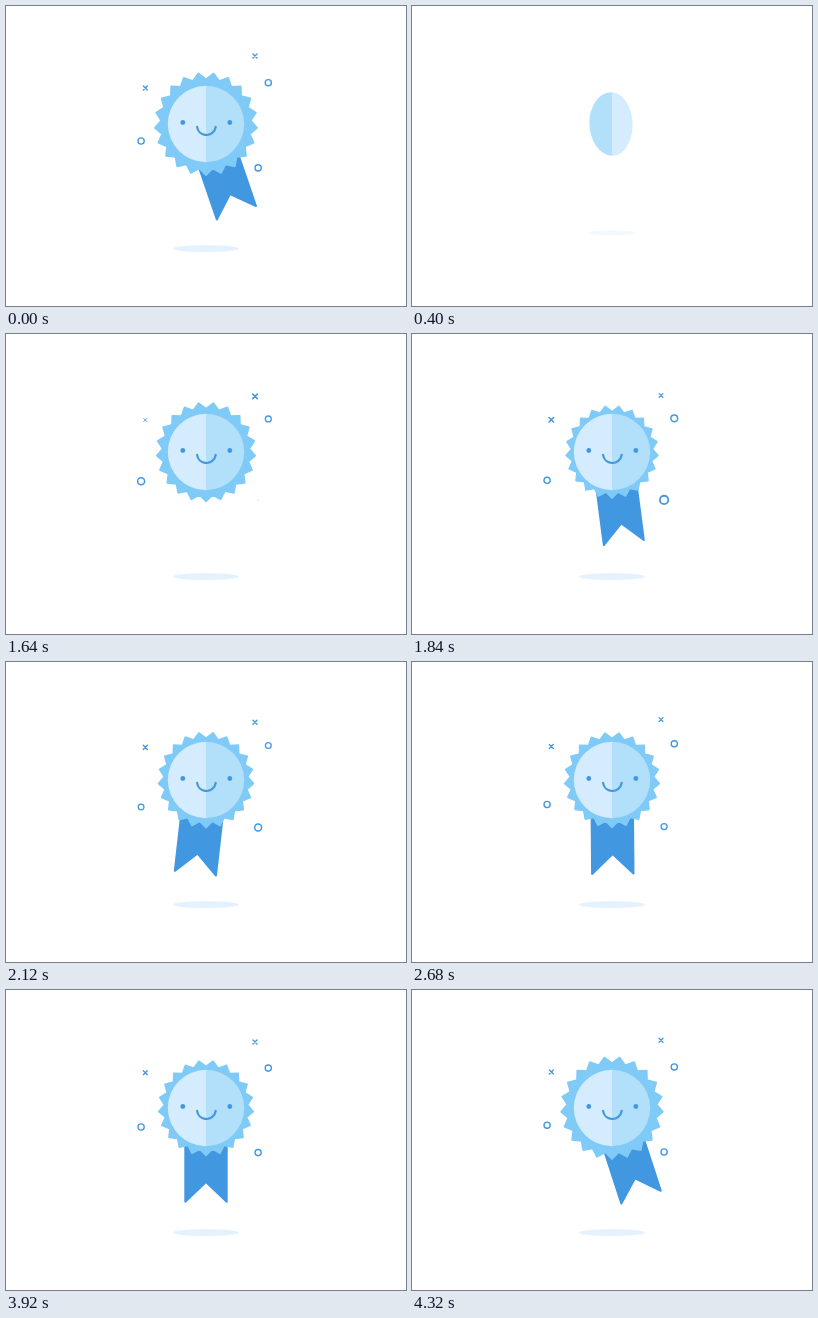
These frames come from a looping animation (400 by 300 pixels, 4.36 s). An HTML page with a canvas:

```html
<!DOCTYPE html>
<html lang="en">
<head>
<meta charset="utf-8">
<title>Smiling rosette</title>
<style>
  html, body { margin: 0; width: 100%; height: 100%; overflow: hidden; background: #fff; }
  canvas { display: block; }
</style>
</head>
<body>
<canvas id="stage" width="400" height="300"></canvas>
<script>
const ctx = document.getElementById('stage').getContext('2d');
const LOOP = 4360, TAU = Math.PI * 2, RAD = Math.PI / 180;
const BLUE = '#4297e1', RAYS = '#7fcaf7', LIGHT = '#d4ecfe', MID = '#b2dffa', SHADE = '#e3f2fe';

// x, y at the end of the loop, drift in px/s, start time, shape
const marks = [
  [249, 50, 4.55, 1130, 'x'],
  [139.3, 82, 1.5, 1285, 'x'],
  [262.3, 76.8, 3, 1365, 'o'],
  [135.1, 135, 4.5, 1390, 'o'],
  [252.1, 161.9, 1.6, 1620, 'o']
];

const span = (t, from, to) => Math.min(1, Math.max(0, (t - from) / (to - from)));
const inOut = p => p < .5 ? 2 * p * p : 1 - 2 * (1 - p) ** 2;
const easeOut = p => 1 - (1 - p) ** 2;
const spring = (t, decay, period) => {
  const s = t / 1000;
  return s <= 0 ? 0 : 1 - Math.exp(-decay * s) * Math.cos(TAU * s / period);
};

function layer(draw) {
  ctx.save();
  draw();
  ctx.restore();
}

function fillEllipse(x, y, rx, ry, color) {
  ctx.fillStyle = color;
  ctx.beginPath();
  ctx.ellipse(x, y, rx, ry, 0, 0, TAU);
  ctx.fill();
}

function fillRounded(color, width) {
  ctx.closePath();
  ctx.fillStyle = ctx.strokeStyle = color;
  ctx.lineWidth = width;
  ctx.fill();
  ctx.stroke();
}

function drawShadow(turn) {
  ctx.globalAlpha = Math.min(1, 1.9 * (1 - turn));
  const size = 1 - .37 * turn;
  fillEllipse(0, 124.6 * (1 - .17 * turn), 33.2 * size, 3.4 * size, SHADE);
}

function drawRibbon(angle, size) {
  ctx.rotate(angle * RAD);
  ctx.scale(size, size);
  ctx.beginPath();
  [[-20.7, 0], [-20.7, 93.8], [0, 74], [20.7, 93.8], [20.7, 0]].forEach(p => ctx.lineTo(...p));
  fillRounded(BLUE, 2);
}

function drawRays(size) {
  ctx.scale(size, size);
  ctx.beginPath();
  for (let i = 0; i < 42; i++) {
    const r = i % 2 ? 41.6 : 47.4, a = Math.PI / 2 + i * Math.PI / 21;
    ctx.lineTo(r * Math.cos(a), r * Math.sin(a));
  }
  fillRounded(RAYS, 1.6);
}

function drawDisc(turn, alpha) {
  const phi = turn * Math.PI, size = 1 - .23 * turn, depth = .065 * Math.sin(phi);
  ctx.globalAlpha = alpha;
  ctx.transform(size * Math.cos(phi), -.045 * size * Math.sin(phi), 0, size, 0, 0);
  for (const side of [-1, 1]) {
    ctx.fillStyle = side < 0 ? LIGHT : MID;
    ctx.beginPath();
    ctx.ellipse(0, 0, 38.2 * (1 + side * depth), 38.2, 0, -Math.PI / 2, Math.PI / 2, side < 0);
    ctx.fill();
  }
  if (turn >= .5) return;
  fillEllipse(-23.2, -1.5, 2.4, 2.4, BLUE);
  fillEllipse(23.8, -1.5, 2.4, 2.4, BLUE);
  ctx.rotate(245 * turn * RAD);
  ctx.strokeStyle = BLUE;
  ctx.lineWidth = 2.2;
  ctx.beginPath();
  ctx.arc(.4, 1.6, 9.4, 8 * RAD, 172 * RAD);
  ctx.stroke();
}

function drawMark(x, y, size, shape) {
  ctx.translate(x, y);
  ctx.scale(size, size);
  ctx.strokeStyle = BLUE;
  ctx.lineWidth = 1.35;
  ctx.beginPath();
  if (shape === 'o') {
    ctx.arc(0, 0, 3.1, 0, TAU);
  } else {
    ctx.moveTo(-2, -2); ctx.lineTo(2, 2);
    ctx.moveTo(2, -2); ctx.lineTo(-2, 2);
  }
  ctx.stroke();
}

function render(now) {
  let t = now % LOOP;
  if (t < 700) t += LOOP; // the exit runs past the loop point
  const out = t - LOOP;
  const turn = out > 0 ? inOut(span(out, 120, 560)) : 1 - inOut(span(t, 800, 1374));
  const alpha = span(t, 770, 960) * (1 - span(out, 440, 640));
  const windUp = easeOut(span(t, 4120, 4378));
  const shrink = 1 - span(out, 10, 280) ** 2;

  const swing = Math.max(0, t - 1700) / 1000;
  const settle = 1 - span(t, 2600, 3040);
  const angle = -23 * Math.exp(-3 * swing) * Math.cos(TAU * swing / .84) * settle - 19 * windUp;
  const ribbon = easeOut(span(t, 1690, 1870)) * shrink;
  const rays = spring(t - 1240, 6, .6) * (1 + .08 * windUp) * shrink;

  ctx.clearRect(0, 0, 400, 300);
  ctx.lineJoin = ctx.lineCap = 'round';
  layer(() => {
    ctx.translate(200, 118);
    layer(() => drawShadow(turn));
    if (ribbon > 0) layer(() => drawRibbon(angle, ribbon));
    if (rays > 0) layer(() => drawRays(rays));
    if (alpha > 0) layer(() => drawDisc(turn, alpha));
  });
  for (const [x, y, drift, start, shape] of marks) {
    const size = spring(t - start, 3.5, .36) * shrink;
    const rise = Math.max(0, -out) / 1000 * drift;
    if (size > 0) layer(() => drawMark(x, y + rise, size, shape));
  }
}

const begin = performance.now();
function tick() {
  render(performance.now() - begin);
  requestAnimationFrame(tick);
}
tick();
</script>
</body>
</html>
```
